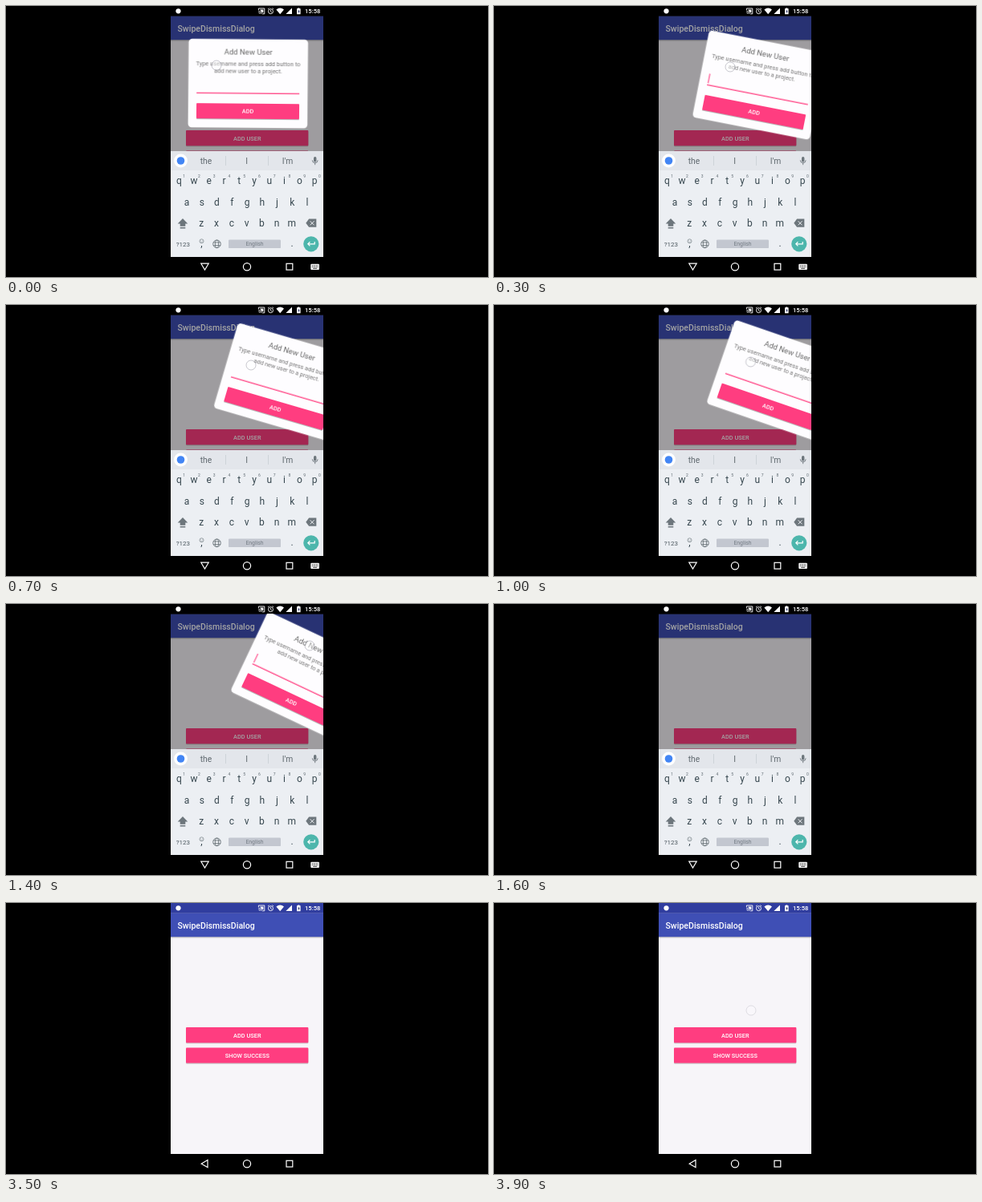
Write an HTML page that moves like this. It is 600 px wide and 338 px high and loops after 4 s.

```html
<!DOCTYPE html>
<html lang="en">
<head>
<meta charset="utf-8">
<title>Swipe to dismiss</title>
<style>
html, body { margin: 0; width: 100%; height: 100%; overflow: hidden; background: #000; }
svg { display: block; width: 100vw; height: 100vh; }
text { font: 400 7.39px Roboto, sans-serif; text-anchor: middle; }
.btn { fill: #ff3d80; }
.label { font-weight: 500; fill: #fff; }
.title { font-size: 10.56px; font-weight: 500; fill: #fff; text-anchor: start; }
.heading { font-size: 9.5px; fill: #666; }
.body { fill: #757575; }
.hint { font-size: 10.3px; fill: #5f686e; }
.key { font-size: 12px; fill: #37474f; }
.digit { font-size: 5px; fill: #5f6b72; }
.line { fill: none; stroke: #fff; stroke-width: 1.2; }
.thin { fill: none; stroke: #5d686e; stroke-width: .8; }

#dialog, #touch, #dim, #keyboard, #cursor, .imeNav, .plainNav {
  animation: 4s -5ms infinite step-end;
}
#dialog { animation-name: swipe; }
#touch { animation-name: touch; }
#dim { animation-name: dim; }
#keyboard { animation-name: slide; }
#cursor { animation-name: blink; }
.imeNav { animation-name: ime; }
.plainNav { animation-name: plain; }

/* The picture advances in 100 ms ticks (2.5%). */
@keyframes swipe {
  0% { transform: translate(301.3px, 96.7px) rotate(.5deg); animation-timing-function: steps(3); }
  7.5% { transform: translate(330.3px, 98.6px) rotate(11.1deg); animation-timing-function: steps(4); }
  17.5% { transform: translate(344.9px, 95.9px) rotate(16.3deg); animation-timing-function: steps(6); }
  32.5% { transform: translate(360px, 93.5px) rotate(21.8deg); }
  35% { transform: translate(369.8px, 90.8px) rotate(25.3deg); }
  37.5% { transform: translate(415px, 80px) rotate(41deg); }
  40%, 100% { transform: translate(520px, 50px) rotate(80deg); }
}
@keyframes touch {
  0% { transform: translate(262px, 74px); opacity: 1; animation-timing-function: steps(3); }
  7.5% { transform: translate(294px, 76px); opacity: 1; animation-timing-function: steps(4); }
  17.5% { transform: translate(305px, 75px); opacity: 1; animation-timing-function: steps(6); }
  32.5% { transform: translate(334px, 67px); opacity: 1; }
  35% { transform: translate(378px, 52px); opacity: 1; }
  37.5% { transform: translate(320px, 134px); opacity: 0; }
  95%, 100% { transform: translate(320px, 134px); opacity: .5; }
}
@keyframes dim {
  0% { opacity: 1; }
  42.5% { opacity: .45; }
  45% { opacity: .06; }
  50%, 100% { opacity: 0; }
}
@keyframes slide {
  0% { transform: none; }
  42.5% { transform: translateY(66px); }
  45%, 100% { transform: translateY(140px); }
}
@keyframes blink {
  0% { opacity: 0; }
  5% { opacity: 1; }
  17.5% { opacity: 0; }
  30%, 100% { opacity: 1; }
}
@keyframes ime {
  0% { opacity: 1; }
  42.5%, 100% { opacity: 0; }
}
@keyframes plain {
  0% { opacity: 0; }
  42.5%, 100% { opacity: 1; }
}
</style>
</head>
<body>
<svg viewBox="0 0 600 338">
  <defs>
    <clipPath id="screen"><rect x="205" y="12.5" width="190" height="300.5"/></clipPath>
    <linearGradient id="fade" x2="0" y2="1">
      <stop stop-opacity=".25"/><stop offset="1" stop-opacity="0"/>
    </linearGradient>
    <filter id="lift" x="-10%" y="-20%" width="120%" height="150%">
      <feDropShadow dx="0" dy=".8" stdDeviation=".7" flood-opacity=".35"/>
    </filter>
  </defs>
  <rect width="600" height="338"/>

  <!-- app -->
  <rect x="205" width="190" height="313" fill="#f7f5f9"/>
  <rect x="205" y="42" width="190" height="2.5" fill="url(#fade)"/>
  <rect x="205" y="12.5" width="190" height="29.7" fill="#3f4fb5"/>
  <rect x="205" width="190" height="12.7" fill="#303d9f"/>
  <text class="title" x="213.5" y="31.6">SwipeDismissDialog</text>
  <g filter="url(#lift)">
    <rect class="btn" x="224" y="155" width="152.3" height="19.3" rx="1"/>
    <rect class="btn" x="224" y="180.5" width="152.3" height="19" rx="1"/>
  </g>
  <text class="label" x="300.3" y="167.6">ADD USER</text>
  <text class="label" x="300.3" y="192.8">SHOW SUCCESS</text>

  <g id="dim">
    <rect x="205" y="12.5" width="190" height="300.5" opacity=".36"/>
    <rect x="205" width="190" height="12.7"/>
  </g>

  <g clip-path="url(#screen)">
    <g id="dialog">
      <rect x="-74.3" y="-55.3" width="148.6" height="110.6" rx="4.5" fill="#fefdff"/>
      <text class="heading" y="-36.2">Add New User</text>
      <text class="body" y="-21.7">Type username and press add button to</text>
      <text class="body" y="-13.1">add new user to a project.</text>
      <rect id="cursor" class="btn" x="-63.6" y="-2" width="1.1" height="12"/>
      <rect class="btn" x="-64" y="11.6" width="128" height="1.3"/>
      <rect class="btn" x="-64" y="25" width="128" height="19" rx="1" filter="url(#lift)"/>
      <text class="label" y="37.2">ADD</text>
    </g>

    <g id="keyboard">
      <rect x="205" y="181" width="190" height="132" fill="#eceff3"/>
      <rect x="205" y="181" width="190" height="24" fill="#e3e6eb"/>
      <circle cx="217.5" cy="193" r="8.4" fill="#fff"/>
      <circle cx="217.5" cy="193" r="4.8" fill="#4285f4"/>
      <path d="M273.5 187v12M326.5 187v12" stroke="#c9ced3" stroke-width=".8"/>
      <text class="hint" x="249" y="196.7">the</text>
      <text class="hint" x="299.6" y="196.7">I</text>
      <text class="hint" x="350.5" y="196.7">I'm</text>
      <rect x="383" y="188" width="3.4" height="6.6" rx="1.7" fill="#6d767c"/>
      <path class="thin" d="M381.3 192.3a3.4 3.4 0 0 0 6.8 0M384.7 195.8v2.4"/>
      <g id="keys"></g>
      <path d="M220 265l6.3 6.5h-3v3.2h-6.6v-3.2h-3zM216.7 276h6.6v1.4h-6.6z" fill="#6d767c"/>
      <path d="M373.3 270.8l3.8-5.2h9.2v10.2h-9.2z" fill="#6d767c"/>
      <path d="M378.6 268.3l5 5m0-5l-5 5" stroke="#eceff3"/>
      <text x="220.4" y="299.8" style="font-size:8px" fill="#4b575e">?123</text>
      <circle class="thin" cx="243.5" cy="293.3" r="2.5" style="stroke-width:.6"/>
      <path class="thin" d="M242.3 293.8q1.2 1.6 2.4 0M242.6 292.5h.4M244 292.5h.4" style="stroke-width:.5"/>
      <text class="key" x="243.5" y="300">,</text>
      <g class="thin">
        <circle cx="262.5" cy="296.8" r="4.8"/>
        <ellipse cx="262.5" cy="296.8" rx="2.1" ry="4.8"/>
        <path d="M258.2 295h8.6M258.2 298.6h8.6"/>
      </g>
      <rect x="277" y="291.5" width="65" height="10.6" rx="1.2" fill="#c3c7d0"/>
      <text x="309.5" y="299.3" style="font-size:6.8px" fill="#737b84">English</text>
      <text class="key" x="356" y="300">.</text>
      <circle cx="379.8" cy="296.8" r="9.6" fill="#4db6ac"/>
      <path class="line" d="M384.2 294v2.8h-8.2M378.4 294.2l-2.6 2.6 2.6 2.6"/>
    </g>
  </g>

  <!-- status bar -->
  <g fill="#fff">
    <circle cx="214.5" cy="6.3" r="3.1"/>
    <path class="line" style="stroke-width:.9" d="M314.4 5.2V3h7.4v6.8h-3M314.3 6.2a3.6 3.6 0 0 1 3.4 3.6M314.3 8a1.8 1.8 0 0 1 1.6 1.8"/>
    <path d="M316.2 4.6h4.2v3.6h-2z"/>
    <circle class="line" style="stroke-width:.9" cx="329.5" cy="6.7" r="3"/>
    <path class="line" style="stroke-width:.8" d="M329.5 4.8v2.1l1.4.9M326 4l1.6-1.4M333 4l-1.6-1.4"/>
    <path d="M336.4 4.4q4.8-3.7 9.6 0l-4.8 5.9z"/>
    <path d="M356 2.6v7.5h-7.6z"/>
    <path d="M362 3.3h1.2v-.9h2.2v.9h1.2v7h-4.6z"/>
    <path d="M364.8 4.6l-1.6 2.6h1.1v2l1.5-2.7h-1z" fill="#222a60"/>
    <text class="label" x="381.7" y="9.2" style="font-size:7.6px">15:58</text>
  </g>

  <!-- navigation bar -->
  <g class="line">
    <path class="imeNav" d="M242.8 321.2h9.4l-4.7 7.8z"/>
    <path class="plainNav" d="M251 320.6v9.2l-7.8-4.6z"/>
    <circle cx="300" cy="325.2" r="4.6"/>
    <rect x="349" y="321.3" width="7.8" height="7.8"/>
  </g>
  <g class="imeNav">
    <rect x="379.3" y="321.7" width="10.6" height="7.2" rx="1" fill="#fff"/>
    <path d="M380.8 323.7h7.8M380.8 325.4h7.8" stroke="#000" stroke-width=".9" stroke-dasharray=".9 .8"/>
    <path d="M382.2 327.3h5" stroke="#000" stroke-width=".8"/>
  </g>

  <g id="touch">
    <circle r="6" fill="#fff" fill-opacity=".45" stroke="#667" stroke-opacity=".35"/>
  </g>
</svg>
<script>
const keys = document.getElementById('keys');

function row(chars, x, y, kind) {
  [...chars].forEach((char, i) => {
    const text = document.createElementNS(keys.namespaceURI, 'text');
    text.setAttribute('class', kind);
    text.setAttribute('x', x + i * 18.75);
    text.setAttribute('y', y);
    text.textContent = char;
    keys.append(text);
  });
}

row('qwertyuiop', 215.3, 222, 'key');
row('1234567890', 221.7, 213.6, 'digit');
row('asdfghjkl', 225, 248.6, 'key');
row('zxcvbnm', 243.3, 275, 'key');
</script>
</body>
</html>
```
